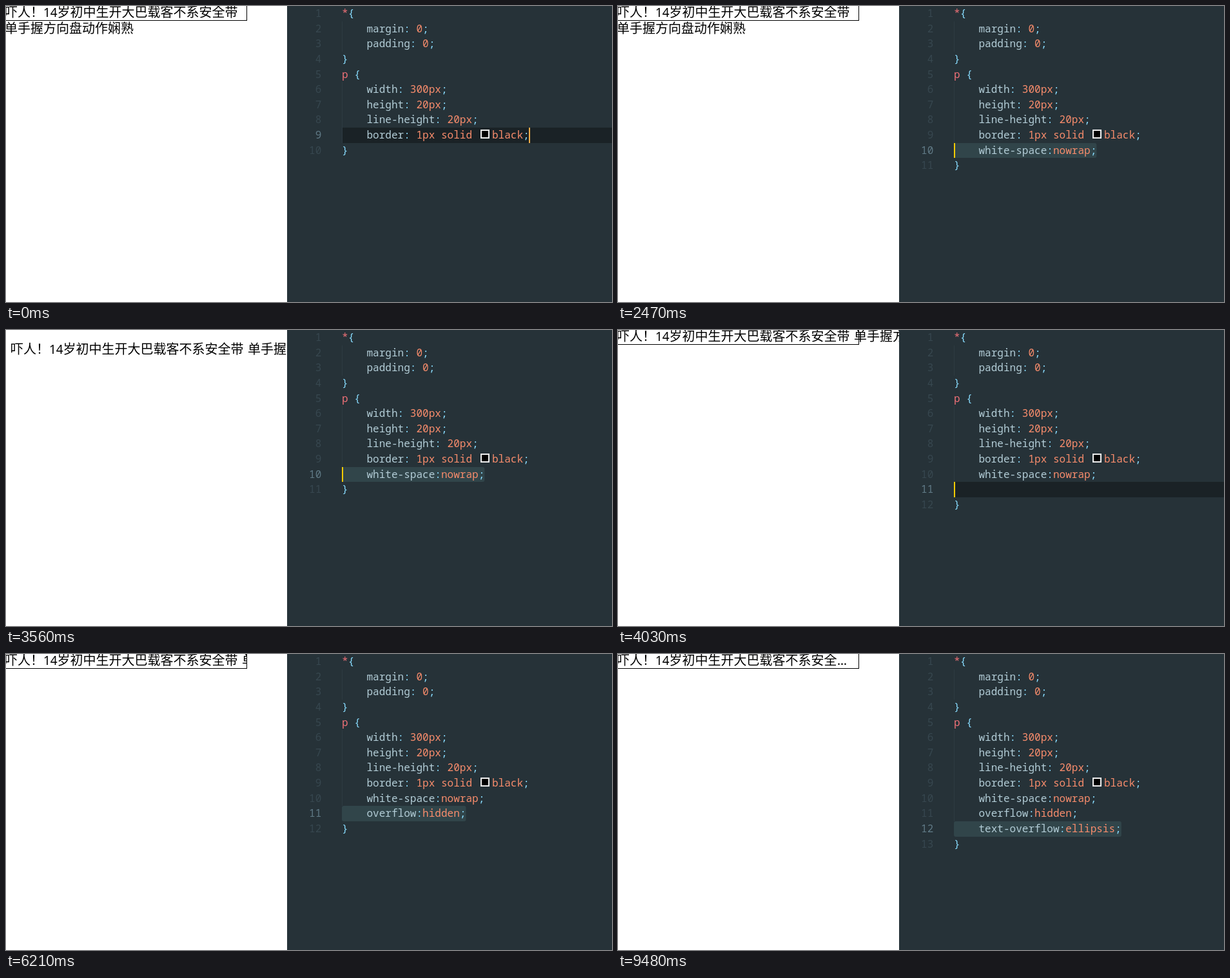
Write an HTML page that moves like this. It is 940 px wide and 460 px high and loops after 9.94 s.

```html
<!DOCTYPE html>
<html lang="zh-CN">
<head>
<meta charset="utf-8">
<style>
  html, body { margin: 0; width: 100%; height: 100%; overflow: hidden; background: #fff; }
  svg { display: block; }
  text { white-space: pre; }
  .page { font: 20px "Noto Sans CJK SC", "Noto Sans CJK", sans-serif; }
  .latin { font: 19px "Noto Sans", sans-serif; }
  .code { font: 16.04px "Noto Sans Mono", monospace; fill: #fff; }
  .sel { fill: #f07178; }
  .prop { fill: #b2ccd6; }
  .punct { fill: #89ddff; }
  .val { fill: #f78c6c; }
  .num { fill: #37474f; text-anchor: end; }
  .num.on { fill: #607a86; }
</style>
</head>
<body>
<svg id="stage" width="940" height="460" viewBox="0 0 940 460"></svg>
<script>
const LOOP = 9940, LEFT = 521, PITCH = 23.63, CHAR = 9.624;
const svg = document.getElementById('stage');

const BASE = ['*{', '    margin: 0;', '    padding: 0;', '}', 'p {', '    width: 300px;',
  '    height: 20px;', '    line-height: 20px;', '    border: 1px solid black;'];
// Each added line: when it opens, when its text appears, when it gets its colours.
const ADDED = [
  { text: '    white-space:nowrap;', open: 1480, fill: 2470, tint: 2470 },
  { text: '    overflow:hidden;', open: 3960, fill: 4660, tint: 4740 },
  { text: '    text-overflow:ellipsis;', open: 6360, fill: 7000, tint: 7060 }
];
const BLINKS = [70, 530, 1080, 1480, 2000, 2470, 3020, 3500, 4510, 4660, 5210, 5670,
  6210, 6360, 6830, 7000, 7520, 8010, 8540, 9010, 9480];
const RELOADS = [2550, 3560], RELOAD_TIME = 80;
const NOWRAP = 3640, HIDDEN = 5820, ELLIPSIS = 8160;

const rowTop = i => Math.round(i * PITCH);
const rect = (x, y, w, h, fill, more = '') =>
  `<rect x="${x}" y="${y}" width="${w}" height="${h}" fill="${fill}" ${more}/>`;
const text = (x, y, cls, body) => `<text x="${x}" y="${y}" class="${cls}">${body}</text>`;
const span = (cls, body, more = '') => `<tspan class="${cls}" ${more}>${body}</tspan>`;

function paint(line) {
  const decl = line.match(/^( *[\w-]+)(: ?)(.*);$/);
  if (!decl) {
    const [, name, brace] = line.match(/^([^{}]*)(.*)$/);
    return span('sel', name) + span('punct', brace);
  }
  const [, prop, colon, value] = decl;
  const [plain, named] = value.split(/(?=black)/);
  return span('prop', prop) + span('punct', colon) + span('val', plain) +
    (named ? span('val', named, 'x="754"') : '') + span('punct', ';');
}

function headline(x, y, first, rest = '') {
  return text(x, y, 'page', '吓人！') + text(x + 60, y, 'latin', '14') +
    text(x + 81.5, y, 'page', first) + (rest && text(x + 368, y, 'page', rest));
}

function page(t) {
  const first = '岁初中生开大巴载客不系安全带', rest = '单手握方向盘动作娴熟';
  if (RELOADS.some(r => t >= r && t < r + RELOAD_TIME)) return headline(7, 37, first, rest);
  const box = rect(-2.5, -3.5, 376, 26, 'none', 'stroke="#000"');
  if (t < NOWRAP) return box + headline(-2, 17, first) + text(-2, 42, 'page', rest);
  if (t < HIDDEN) return box + headline(-2, 17, first, rest);
  const body = t < ELLIPSIS ? headline(-2, 17, first, rest)
    : headline(-2, 17, first.slice(0, -1)) + text(340, 17, 'latin', '…');
  return `<clipPath id="pad"><rect x="-2" y="-3" width="375" height="25"/></clipPath>` +
    box + `<g clip-path="url(#pad)">${body}</g>`;
}

function editor(t) {
  const opened = ADDED.filter(a => t >= a.open), last = opened[opened.length - 1];
  const lines = [...BASE, ...opened.map(a => t >= a.fill ? a.text : ''), '}'];
  const active = lines.length - 2, y = rowTop(active), h = rowTop(active + 1) - y;
  const selected = last && t >= last.fill;
  const guide = (from, to) => rect(LEFT, rowTop(from), 1, rowTop(to) - rowTop(from), '#2d3b42');

  let out = rect(436, 0, 504, 460, '#263238');
  out += selected
    ? rect(LEFT, y, last.text.length * CHAR, h, '#31454a', 'rx="3"')
    : rect(LEFT, y, 940 - LEFT, h, '#1a2226');
  out += guide(1, 3) + guide(5, selected ? active : active + 1);
  lines.forEach((line, i) => {
    const base = Math.round(i * PITCH + 17);
    const raw = selected && i === active && t < last.tint;
    out += text(489.3, base, i === active ? 'code num on' : 'code num', i + 1);
    if (line) out += text(LEFT, base, 'code', raw ? line : paint(line));
  });
  out += rect(737, 193, 12, 12, '#000', 'stroke="#eee" stroke-width="2"');
  if (BLINKS.filter(b => t >= b).length % 2 === 0)
    out += rect(last ? LEFT : 811, y, 2, h, last ? '#ffcc00' : '#f2ae49');
  return out;
}

let shown = '';
function draw() {
  const t = performance.now() % LOOP, next = page(t) + editor(t);
  if (next !== shown) svg.innerHTML = shown = next;
  requestAnimationFrame(draw);
}
draw();
</script>
</body>
</html>
```
